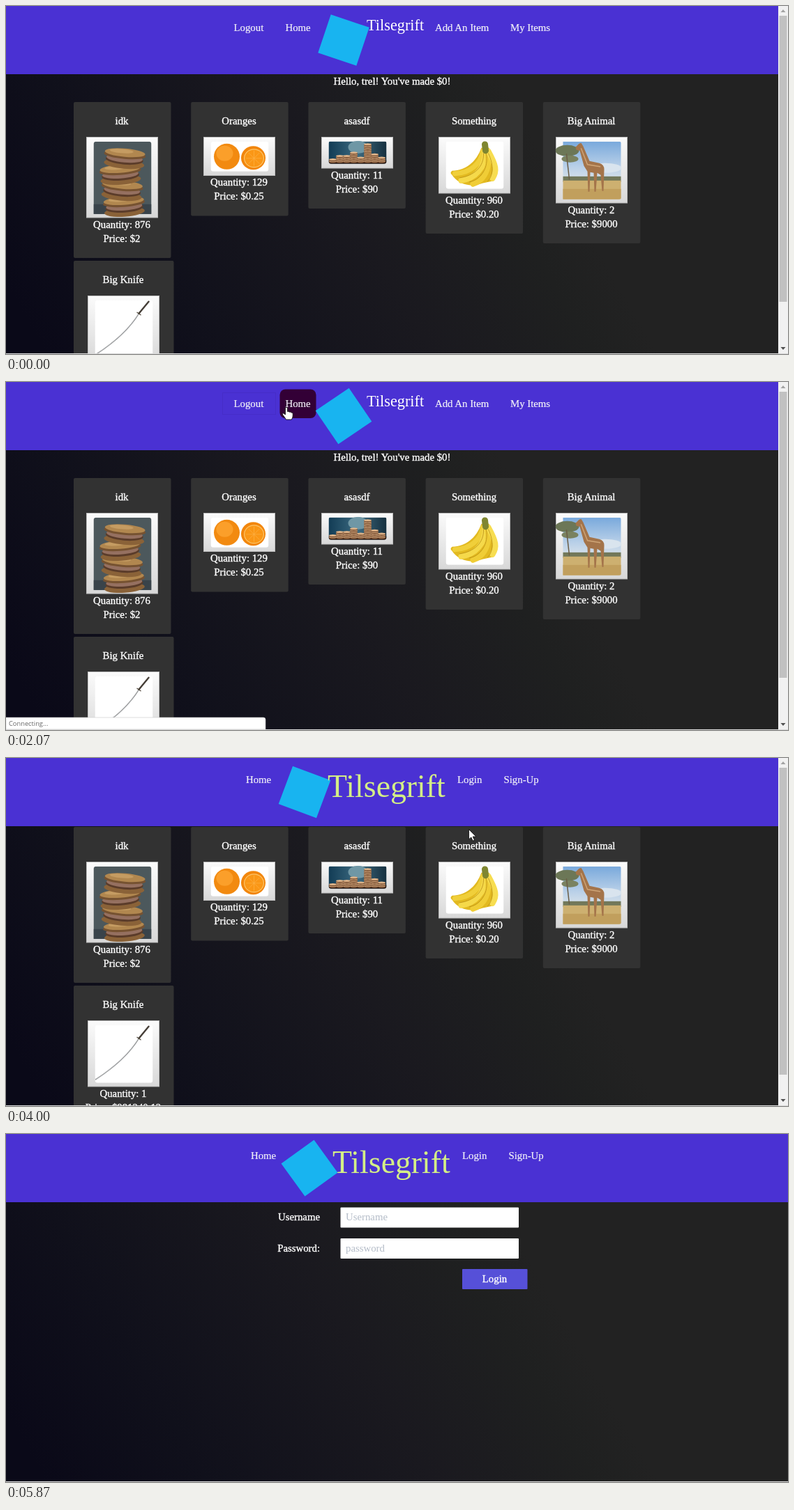
Animation of 1121x500 px, one loop 5940 ms. Source, as an HTML page:

```html
<!DOCTYPE html>
<html lang="en">
<head>
<meta charset="utf-8">
<title>Marketplace demo</title>
<style>
  html, body { margin: 0; width: 100%; height: 100%; overflow: hidden; background: #222; }
  svg { display: block; }
  text { font: 14.8px "Liberation Serif", "Times New Roman", serif; fill: #fff; stroke: #fff; stroke-width: .35px; }
  .nav { fill: #eeeef6; stroke-width: .2px; }
  .title { stroke: none; }
  .small { font: 9.3px "Open Sans", sans-serif; fill: #666; stroke: none; }
  .hint { fill: #b4bcc8; stroke: none; }
  .picture { clip-path: inset(0 round 4px); }
</style>
</head>
<body>
<svg id="stage" width="1121" height="500" viewBox="0 0 1121 500">
  <defs>
    <linearGradient id="dusk" gradientUnits="userSpaceOnUse" x1="-208" y1="120" x2="485" y2="-280">
      <stop offset=".05" stop-color="#0a0918"/>
      <stop offset=".3" stop-color="#10101b"/>
      <stop offset=".65" stop-color="#1a191f"/>
      <stop offset=".9" stop-color="#1f2020"/>
      <stop offset="1" stop-color="#222"/>
    </linearGradient>
    <linearGradient id="mat" x1="0" y1="0" x2="0" y2="1">
      <stop offset="0" stop-color="#fbfbfb"/>
      <stop offset="1" stop-color="#d8d8d8"/>
    </linearGradient>
    <linearGradient id="sky" x1="0" y1="0" x2="0" y2="1">
      <stop offset="0" stop-color="#79a9dc"/>
      <stop offset=".6" stop-color="#b9d0e8"/>
      <stop offset="1" stop-color="#dfe6ea"/>
    </linearGradient>
    <linearGradient id="teal" x1="0" y1="0" x2="1" y2="0">
      <stop offset="0" stop-color="#123c55"/>
      <stop offset=".5" stop-color="#3c6a80"/>
      <stop offset="1" stop-color="#16303f"/>
    </linearGradient>
  </defs>
  <rect width="1121" height="500" fill="url(#dusk)"/>
  <g id="cards"></g>
  <g id="form"></g>
  <rect width="1121" height="98" fill="#4a31d3"/>
  <rect id="focus" x="310.5" y="15.5" width="76" height="31" fill="none" stroke="#452cc8"/>
  <rect id="pill" y="10.5" height="41.5" rx="8" fill="#330036"/>
  <rect id="badge" x="-29" y="-29" width="58" height="58" fill="#18b4f0"/>
  <g id="userNav"></g>
  <g id="guestNav"></g>
  <g id="scrollbar">
    <rect x="1107" width="14" height="499" fill="#f1f1f1"/>
    <rect id="thumb" x="1108.5" y="14" width="11" fill="#c1c1c1"/>
    <path d="M1110.5 9l3.5-4 3.5 4z" fill="#a3a3a3"/>
    <path d="M1110.5 490l3.5 4 3.5-4z" fill="#505050"/>
  </g>
  <rect y="499" width="1121" height="1" fill="#d8d8d8"/>
  <g id="status">
    <path id="bubble" fill="#fff" stroke="#c8c8c8" stroke-width=".6"/>
    <text id="statusText" class="small" x="4" y="494"></text>
  </g>
  <path id="arrow" d="M0 0v14.5l3.4-3 2.3 5.2 2.4-1-2.3-5.1h4.6z" fill="#fff" stroke="#111" stroke-width=".9"/>
  <path id="hand" d="M-1.6 1.2Q0-.8 1.6 1.2V6.6Q3 5.6 4.2 7.2 5.8 6.4 6.8 8 8.8 7.4 9.2 9.4V13Q9 15.4 7.4 18H-.6Q-2.4 14.6-5 11.6-6.4 9.4-4.6 9-3 9-1.6 11z" fill="#fff" stroke="#111" stroke-width=".9"/>
</svg>
<script>
const LOOP = 5940, LOGOUT = 2530, ITEMS = 2800, LOGIN = 4340;
const BRAND = "Tilsegrift";
const el = id => document.getElementById(id);

const text = (x, y, s, extra = "") => `<text x="${x}" y="${y}" ${extra}>${s}</text>`;
const centred = (x, y, s) => text(x, y, s, 'text-anchor="middle"');
const rect = (x, y, w, h, fill, extra = "") =>
  `<rect x="${x}" y="${y}" width="${w}" height="${h}" fill="${fill}" ${extra}/>`;
const oval = (x, y, rx, ry, fill) => `<ellipse cx="${x}" cy="${y}" rx="${rx}" ry="${ry}" fill="${fill}"/>`;
const line = (d, stroke, width) =>
  `<path d="${d}" fill="none" stroke="${stroke}" stroke-width="${width}" stroke-linecap="round"/>`;
const shape = (d, fill) => `<path d="${d}" fill="${fill}"/>`;
const range = (n, fn) => Array.from({ length: n }, (_, i) => fn(i)).join("");

// Product pictures, each 82.5 wide
const pictures = {
  cookies: () => rect(0, 0, 83, 104, "#4c585c") + rect(0, 90, 83, 14, "#39434a") +
    range(4, i => {
      const layer = 3 - i, x = 41 + 4 * Math.cos(layer * 2.4), y = 18 + layer * 23;
      return `<g transform="rotate(${layer % 2 ? -4 : 5} ${x} ${y})">` +
        oval(x, y + 14, 29, 7, "#8a6238") + oval(x, y + 8, 27, 7, "#5b3c2a") +
        oval(x, y + 6, 26, 6, "#957060") + oval(x, y + 1, 30, 6, "#765231") +
        oval(x, y - 2, 29, 6, "#b1874f") + oval(x - 5, y - 4, 17, 3, "#c59c62") + "</g>";
    }),
  oranges: () => rect(0, 0, 83, 43, "#fff") + oval(23, 21.5, 18.5, 18.5, "#f28a10") +
    oval(20, 17, 12, 11, "#fb9f2a") + oval(61, 23.5, 17.5, 17, "#f2860c") + oval(62, 24, 14.5, 13.5, "#fcc468") +
    oval(62, 24, 13.3, 12.3, "#fa9716") +
    range(4, i => `<path d="M51 24h22" stroke="#fcb045" stroke-width=".7" transform="rotate(${i * 45} 62 24)"/>`),
  coins: () => rect(0, 0, 83, 32, "url(#teal)") + oval(42, 8, 14, 9, "#6f97a5") + rect(0, 27, 83, 5, "#2d1c14") +
    range(8, i => {
      const height = [2, 4, 4, 6, 3, 11, 5, 3][i];
      return range(height, j =>
        oval(6 + i * 10, 29 - j * 2.4, 5.5, 1.9, "#6d4327") + oval(6 + i * 10, 28 - j * 2.4, 5.3, 1.5, "#dcb288"));
    }),
  bananas: () => rect(0, 0, 83, 68, "#fff") +
    shape("M51 9C43 30 29 41 9 42Q5 45 9 48C18 62 36 66 52 60L66 57Q76 46 73 33 66 25 62 9z", "#e2b920") +
    line("M53 14C50 32 35 45 13 46", "#f0cf3a", 7) + line("M56 14C57 38 42 53 22 56", "#f5d94a", 8) +
    line("M59 14C65 38 55 56 39 61", "#f0cd36", 8) + line("M61 14C72 34 74 42 67 53", "#f7dd50", 8) +
    line("M54 17C55 36 41 49 20 52", "#b88d16", .8) + line("M58 17C62 38 50 55 34 58", "#b88d16", .8) +
    line("M61 17C70 36 67 50 60 57", "#b88d16", .8) + line("M56 4L57 13", "#7f8630", 9),
  giraffe: () => rect(0, 0, 83, 60, "url(#sky)") + oval(60, 38, 24, 7, "#d9e4ee") +
    rect(0, 50, 83, 8, "#72785a") + rect(0, 56, 83, 27, "#cdb070") + rect(0, 68, 83, 15, "#c19f5d") +
    oval(6, 13, 17, 8, "#6c7757") + oval(10, 25, 12, 5, "#7a8260") + line("M5 18L9 54", "#6b5d46", 1.5) +
    shape("M18 8L23 3 26 2 29 7 38 28 52 31Q59 33 59 40L58 71H56L54 48 49 45 47 72H45L44 45 39 44 38 72H36L35 43 30 35 24 13 19 12z", "#a4744a") +
    line("M26 10L35 33L53 36", "#cfa577", 1.4),
  knife: () => rect(0, 0, 83, 83, "#fff") + line("M1 78Q44 50 63 19", "#8d8f91", 1.5) +
    line("M2 77.4Q44 49.5 62 20", "#dcdedf", .5) + line("M63 19L77 2", "#453e37", 2.4) + line("M60.5 17.5L65.5 21", "#51483c", 1.4)
};

function card(name, picture, height, quantity, price, x, y, width = 139.5) {
  const mid = Math.round(x + width / 2 - .5), frame = y + 50.5, end = frame + height + 12.7;
  return rect(x, y, width, height + 121, "#323232", 'rx="2"') + centred(mid, y + 32, name) +
    rect(mid - 50.5, frame, 102, height + 12.5, "url(#mat)", 'stroke="#bbb"') +
    `<svg class="picture" x="${mid - 40.5}" y="${frame + 6.3}" width="82.5" height="${height}">${pictures[picture]()}</svg>` +
    centred(mid, end + 14.6, `Quantity: ${quantity}`) + centred(mid, end + 34.4, `Price: $${price}`);
}

const shelf = [
  ["idk", "cookies", 103, 876, "2"],
  ["Oranges", "oranges", 42.5, 129, "0.25"],
  ["asasdf", "coins", 32, 11, "90"],
  ["Something", "bananas", 68, 960, "0.20"],
  ["Big Animal", "giraffe", 82, 2, "9000"]
];
el("cards").innerHTML = shelf.map((item, i) => card(...item, 97 + i * 168.2, 138)).join("") +
  card("Big Knife", "knife", 82, 1, "981240.12", 97, 366, 143.5);

// [label, text start, text width]
const userLinks = [["Logout", 326.5, 43], ["Home", 400.5, 36], ["Add An Item", 615, 77], ["My Items", 723, 57]];
const guestLinks = [["Home", 351, 36], ["Login", 654, 35.5], ["Sign-Up", 720.5, 50]];
const links = list => list.map(([label, x]) => text(x, 35.5, label, 'class="nav"')).join("");
const title = (x, y, size, fill) =>
  text(x, y, BRAND, `class="title" style="font-size:${size}px;fill:${fill}"`);

el("userNav").innerHTML = links(userLinks) + title(517, 35, 22.3, "#fff") +
  centred(553.5, 112.7, "Hello, trel! You've made $0!");
el("guestNav").innerHTML = links(guestLinks) + title(468, 56, 45.8, "#d4ef86");

const field = (y, label, hint) => text(450, y + 18.8, label, 'text-anchor="end"') +
  rect(479.5, y, 255.5, 29, "#fff", 'rx="1"') + text(487, y + 18.8, hint, 'class="hint"');
el("form").innerHTML = field(105.5, "Username", "Username") + field(150, "Password:", "password") +
  rect(654, 194, 93.5, 29, "#5650d8", 'rx="1"') + centred(700.5, 213, "Login");

// [time, x, y]
const path = [
  [100, 1125, 490], [600, 434, 110], [1000, 367, 36], [1890, 367, 36], [2030, 402, 36], [2700, 402, 36],
  [3060, 580, 160], [3330, 641, 98], [3600, 632, 187], [3700, 640, 174], [4200, 676, 64],
  [4290, 667, 40], [4540, 667, 40], [4720, 684, -30]
];

function cursorAt(t) {
  const next = path.findIndex(key => key[0] > t);
  if (next <= 0) return null;
  const [t0, x0, y0] = path[next - 1], [t1, x1, y1] = path[next];
  const u = (t - t0) / (t1 - t0), e = u * u * (3 - 2 * u);
  return [x0 + (x1 - x0) * e, y0 + (y1 - y0) * e];
}

function statusAt(t) {
  if (t >= 1000 && t < 2000) return ["localhost:3000", 71.5];
  if (t >= 2000 && t < ITEMS) return ["Connecting...", 372];
  if (t >= 4290 && t < 5000) return ["localhost:3000/login", 372];
  return null;
}

const show = (id, on) => el(id).setAttribute("display", on ? "inline" : "none");
const move = (id, x, y, angle = 0) => el(id).setAttribute("transform", `translate(${x} ${y}) rotate(${angle})`);

function render(t) {
  const user = t < LOGOUT, form = t >= LOGIN, cards = user || (t >= ITEMS && !form);
  const shift = !user && cards ? -7 : 0;

  show("userNav", user);
  show("guestNav", !user);
  move("guestNav", shift, 0);
  show("cards", cards);
  move("cards", 0, user ? 0 : -39);
  show("form", form);
  show("scrollbar", cards);
  el("thumb").setAttribute("height", user ? 411 : 441);
  show("focus", user && t > 1880);
  move("badge", user ? 484 : 435 + shift, 49, (user ? 18.5 : -51.5) + t * .018);

  const cursor = cursorAt(t);
  const hover = cursor && (user ? userLinks : guestLinks).find(([, x, w]) =>
    Math.abs(cursor[1] - 31) < 21 && Math.abs(cursor[0] - x - shift - w / 2) < w / 2 + 8);
  show("pill", hover);
  if (hover) {
    el("pill").setAttribute("x", hover[1] + shift - 8);
    el("pill").setAttribute("width", hover[2] + 16);
  }
  const hand = hover || (t >= LOGOUT && t < 2700);
  show("hand", cursor && hand);
  show("arrow", cursor && !hand);
  if (cursor) move(hand ? "hand" : "arrow", ...cursor);

  const status = statusAt(t);
  show("status", status);
  if (status) {
    el("statusText").textContent = status[0];
    el("bubble").setAttribute("d", `M0 482H${status[1] - 3}q3 0 3 3V499H0z`);
  }
}

const start = performance.now();
function tick() {
  render((performance.now() - start) % LOOP);
  requestAnimationFrame(tick);
}
render(0);
requestAnimationFrame(tick);
</script>
</body>
</html>
```
